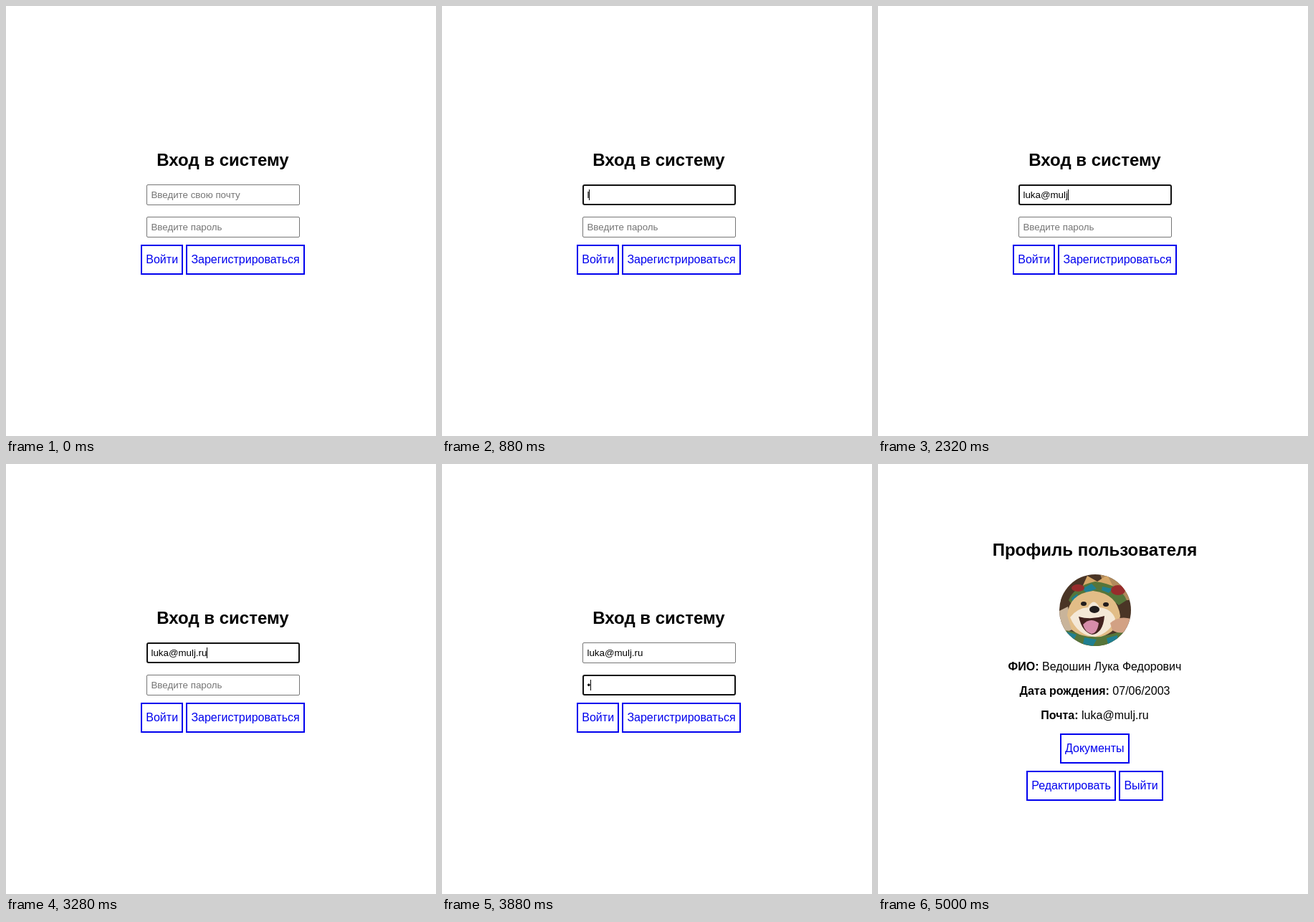
Animation of 600x600 px, one loop 8 s. Source, as an HTML page:

```html
<!DOCTYPE html>
<html lang="ru">
<head>
<meta charset="utf-8">
<title>Вход в систему</title>
<style>
  html, body { margin: 0; width: 100%; height: 100%; overflow: hidden; background: #fff; }
  svg { display: block; width: 100%; height: 100%; font: 16px "Liberation Sans", Arial, sans-serif; }
  .middle { text-anchor: middle; }
  .title { font-size: 24px; font-weight: bold; }
  .bold { font-weight: bold; }
  .value { font-size: 13.333px; }
  .link { fill: #0000ee; }
  .frame { fill: none; stroke: #0000ee; stroke-width: 2; }
</style>
</head>
<body>
<svg id="stage" viewBox="0 0 600 600">
  <g id="login">
    <text class="title middle" x="302.5" y="223">Вход в систему</text>
  </g>
  <g id="profile">
    <text class="title middle" x="302.5" y="128">Профиль пользователя</text>
    <clipPath id="round"><circle cx="303" cy="204" r="50"/></clipPath>
    <g clip-path="url(#round)">
      <rect x="253" y="154" width="100" height="100" fill="#4a3526"/>
      <path d="M310 154h43v36h-30z" fill="#b08a5c"/>
      <path d="M253 205l12-6 6 32-18 8z" fill="#c9b49a"/>
      <path d="M283 176l9-20 14 8 14-9 11 22z" fill="#d6a768"/>
      <path d="M266 190Q274 170 303 164Q338 168 347 190L336 197Q303 168 272 198z" fill="#56753a"/>
      <path d="M285 174l13-7 7 7-14 6zM313 171l14 3-5 6-10-4zM270 187l8-6 2 7-8 6z" fill="#207f91"/>
      <ellipse cx="279" cy="173" rx="9" ry="5" fill="#982c2c"/>
      <ellipse cx="335" cy="176" rx="10" ry="7" fill="#982c2c"/>
      <path d="M253 232Q270 231 283 238Q306 246 353 229V254H253z" fill="#56753a"/>
      <path d="M263 234l14 4-4 8-12-4zM288 242l17 3-5 9-14-3zM319 243l15-4 1 9-14 4z" fill="#207f91"/>
      <path d="M264 211Q267 181 300 177Q334 181 338 212Q335 234 311 241Q283 243 270 231z" fill="#e2bd87"/>
      <path d="M268 214Q278 201 293 200Q301 185 309 200Q326 202 331 216Q324 236 303 241Q279 240 268 214z" fill="#f4e8d7"/>
      <path d="M324 222Q336 211 353 216V232Q338 239 327 232z" fill="#d2a184"/>
      <path d="M280 213Q297 218 316 212Q314 236 299 238Q285 235 280 213z" fill="#43221f"/>
      <path d="M286 224Q296 213 308 222Q306 236 298 237Q289 235 286 224z" fill="#d78daa"/>
      <ellipse cx="302" cy="203" rx="7" ry="5" fill="#211c1c"/>
      <ellipse cx="287" cy="195" rx="4" ry="3" fill="#211c1c"/>
      <ellipse cx="318" cy="196" rx="4" ry="3" fill="#211c1c"/>
    </g>
    <text class="middle" x="302.5" y="288"><tspan class="bold">ФИО:</tspan> Ведошин Лука Федорович</text>
    <text class="middle" x="302.5" y="322"><tspan class="bold">Дата рождения:</tspan> 07/06/2003</text>
    <text class="middle" x="302.5" y="356"><tspan class="bold">Почта:</tspan> luka@mulj.ru</text>
  </g>
</svg>
<script>
const LOOP = 8000;
const FOCUS_EMAIL = 200, FOCUS_PASSWORD = 3400, SIGN_IN = 5000;
const EMAIL = "luka@mulj.ru", PASSWORD = "••••";
const EMAIL_KEYS = [880, 1080, 1200, 1280, 1680, 1920, 2080, 2120, 2320, 2520, 3120, 3280];
const PASSWORD_KEYS = [3880, 4120, 4240, 4320];
const CARET_OFF = [[760, 880], [3040, 3120], [4880, 5000]];
const TEXT_X = 202.45;

const byId = id => document.getElementById(id);
const login = byId("login"), profile = byId("profile");

function add(parent, tag, attrs, text = "") {
  const node = document.createElementNS("http://www.w3.org/2000/svg", tag);
  for (const name in attrs) node.setAttribute(name, attrs[name]);
  node.textContent = text;
  return parent.appendChild(node);
}

function setAttrs(node, attrs) {
  for (const name in attrs) node.setAttribute(name, attrs[name]);
}

function addButton(parent, x, y, width, textX, label) {
  add(parent, "rect", { class: "frame", x: x + 1, y: y + 1, width: width - 2, height: 40 });
  add(parent, "text", { class: "link", x: textX, y: y + 26 }, label);
}

function addField(y, placeholder) {
  const box = add(login, "rect", { fill: "#fff" });
  const text = add(login, "text", { class: "value", x: TEXT_X, y: y + 19 });
  const caret = add(login, "rect", { y: y + 7, width: 1, height: 15 });

  return (value, focused, caretOn) => {
    const inset = focused ? 1 : 0.5;
    setAttrs(box, {
      x: 196 + inset, y: y + inset, width: 214 - 2 * inset, height: 29 - 2 * inset,
      rx: focused ? 2 : 1.5,
      stroke: focused ? "#101010" : "#767676", "stroke-width": 2 * inset
    });
    text.textContent = value || placeholder;
    text.setAttribute("fill", value ? "#000" : "#757575");
    const end = value ? Math.round(TEXT_X + text.getComputedTextLength()) : 203;
    caret.setAttribute("x", end);
    caret.setAttribute("visibility", focused && caretOn ? "inherit" : "hidden");
  };
}

const drawEmail = addField(249, "Введите свою почту");
const drawPassword = addField(294, "Введите пароль");
addButton(login, 188, 333, 59, 195.3, "Войти");
addButton(login, 251, 333, 166, 258.4, "Зарегистрироваться");
addButton(profile, 254, 376, 97, 261, "Документы");
addButton(profile, 207, 428, 125, 214.2, "Редактировать");
addButton(profile, 336, 428, 62, 343.4, "Выйти");

const typed = (text, keys, t) => text.slice(0, keys.filter(key => key <= t).length);

function render(t) {
  const signedIn = t >= SIGN_IN;
  login.setAttribute("visibility", signedIn ? "hidden" : "visible");
  profile.setAttribute("visibility", signedIn ? "visible" : "hidden");
  if (signedIn) t = 0;

  const caretOn = !CARET_OFF.some(([from, to]) => t >= from && t < to);
  drawEmail(typed(EMAIL, EMAIL_KEYS, t), t >= FOCUS_EMAIL && t < FOCUS_PASSWORD, caretOn);
  drawPassword(typed(PASSWORD, PASSWORD_KEYS, t), t >= FOCUS_PASSWORD, caretOn);
}

const start = performance.now();
function tick() {
  render((performance.now() - start) % LOOP);
  requestAnimationFrame(tick);
}
tick();
</script>
</body>
</html>
```
